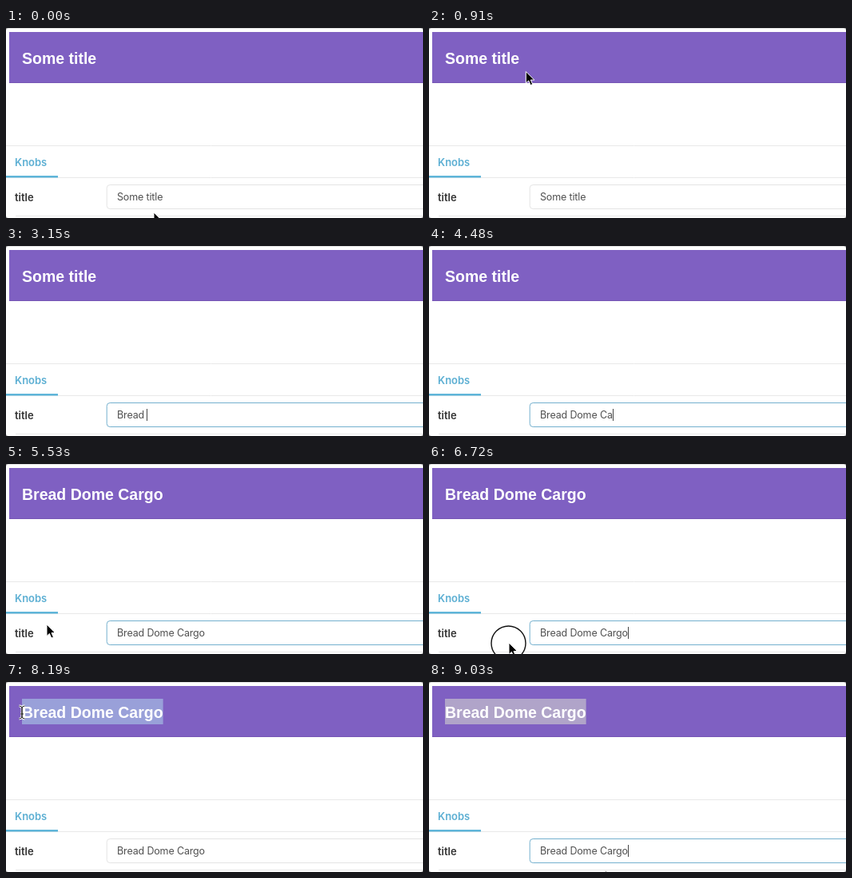
These frames come from a looping animation (522x238 px, 9.17 s). An HTML page:

```html
<!DOCTYPE html>
<html lang="en">
<head>
<meta charset="utf-8">
<title>Knobs demo</title>
<style>
  html, body { margin: 0; width: 100%; height: 100%; overflow: hidden; background: #888; }
  svg { display: block; width: 522px; height: 238px; }
  text { white-space: pre; font: 12.5px Inter, Roboto, sans-serif; }
  .bold { font-size: 13px; font-weight: 600; }
  #heading { font: bold 19.5px "Liberation Sans", Arial, sans-serif; fill: #fff; }
  #value { letter-spacing: -.15px; fill: #505050; }
</style>
</head>
<body>
<svg viewBox="0 0 522 238">
  <rect y=".25" width="522" height="237.75" rx="3" fill="#fff"/>
  <rect x="4" y="5" width="518" height="64" fill="#7f60c2"/>
  <path d="M4 68.5H522" stroke="#7656b5"/>
  <rect id="headSel" x="20" y="21" height="32"/>
  <text id="heading" x="20" y="45"></text>

  <path d="M0 147.5H522M0 187.5H522M12 235.5H522" stroke="#e8e8e8"/>
  <rect y="185" width="65" height="2.5" fill="#5fb5d9"/>
  <text class="bold" x="11" y="173" fill="#5cafd3">Knobs</text>
  <text class="bold" x="11" y="217" fill="#333">title</text>

  <rect id="field" x="126.2" y="196.5" width="420" height="30" rx="4" fill="#fff"/>
  <rect id="valueSel" y="203" height="17" fill="#b8d5f6"/>
  <text id="value" x="139" y="216"></text>
  <rect id="caret" y="204" width="1" height="15" fill="#444"/>

  <g id="pointer">
    <g id="ring" fill="none">
      <circle cx="-.5" cy=".5" stroke="#fff" stroke-opacity=".6" stroke-width="3"/>
      <circle cx="-.5" cy=".5" stroke="#111" stroke-width="1.4"/>
    </g>
    <path id="arrow" d="M0 0V14.5L3.4 11.4L5.8 17L8.4 15.9L6 10.5H10.5Z" fill="#000" stroke="#fff"/>
    <g id="beam" fill="none">
      <path id="bar" d="M-3.5-8Q0-8 0-5V5Q0 8-3.5 8M3.5-8Q0-8 0-5V5Q0 8 3.5 8M-2 2H2" stroke="#fff" stroke-width="2.8"/>
      <use href="#bar" style="display:none"/>
      <path d="M-3.5-8Q0-8 0-5V5Q0 8-3.5 8M3.5-8Q0-8 0-5V5Q0 8 3.5 8M-2 2H2" stroke="#222"/>
    </g>
  </g>
</svg>
<script>
const LOOP = 9170, STEP = 70, LEFT = 139, HEAD_LEFT = 20;
const OLD = 'Some title', NEW = 'Bread Dome Cargo';

// Moments of the story, in ms
const FOCUS = 1260, SELECTED = 1610, TYPE = 2380, UPDATE = 5250, WAKE = 5530;
const PANEL_CLICK = 6580, DRAG = 7630, REFOCUS = 8680;
const WORD_STARTS = [TYPE, 3360, 4200], KEY_GAP = 154, BLINK = 600, GLIDE = 420;
const PRESSES = [[FOCUS, 420], [PANEL_CLICK, 280], [DRAG, 560], [REFOCUS, 140]];

// Pointer stops: arrival time, x, y
const STOPS = [
  [0, 185, 231], [700, 115, 42], [FOCUS, 200, 212], [SELECTED, 18, 215], [1750, 51, 201],
  [6000, 40, 42], [6300, 240, 60], [6720, 100, 224], [7210, 150, 42],
  [7700, 196, 35], [8050, 20, 38], [8610, 280, 211], [LOOP, 200, 245]
];

const $ = id => document.getElementById(id);
const set = (id, attrs) => { for (const k in attrs) $(id).setAttribute(k, attrs[k]); };
const show = (id, on) => set(id, { visibility: on ? 'visible' : 'hidden' });
const clamp = v => Math.max(0, Math.min(1, v));

// Each glide ends on its stop; spare time before it is spent at rest.
function pointerAt(t) {
  const i = STOPS.findIndex(s => s[0] > t);
  const [t0, x0, y0] = STOPS[i - 1], [t1, x1, y1] = STOPS[i];
  const span = Math.min(GLIDE, t1 - t0);
  const u = clamp(1 - (t1 - t) / span), ease = u * u * (3 - 2 * u);
  return [x0 + (x1 - x0) * ease, y0 + (y1 - y0) * ease];
}

function typedAt(t) {
  return NEW.split(/(?<= )/).map((word, i) =>
    word.slice(0, Math.max(0, Math.floor((t - WORD_STARTS[i]) / KEY_GAP) + 1))).join('');
}

function caretAt(t) {
  if (t < WAKE) return t >= TYPE;
  return t >= REFOCUS || (t < DRAG && Math.floor((t - WAKE) / BLINK) % 2 === 1);
}

function drawPointer(t, x, y) {
  const visible = t <= TYPE || t >= WAKE;
  const overText = (y > 21 && y < 53 && x > 16 && x < 215) || (x > 126 && y > 196 && y < 227);
  const press = PRESSES.find(([at, hold]) => t >= at && t < at + hold);
  set('pointer', { transform: `translate(${x} ${y})` });
  show('arrow', visible && !overText);
  show('beam', visible && overText);
  show('ring', visible && press);
  if (press) {
    const r = 12.5 + 9 * clamp((t - press[0]) / 140);
    for (const circle of $('ring').children) circle.setAttribute('r', r);
  }
}

function drawField(t, x) {
  $('value').textContent = t < TYPE ? OLD : typedAt(t);
  const end = LEFT + $('value').getComputedTextLength();
  const fade = at => clamp((t - at) / 200);
  const focus = fade(FOCUS) - fade(DRAG) + fade(REFOCUS);
  const mix = (a, b) => Math.round(a + (b - a) * focus);
  set('field', { stroke: `rgb(${mix(228, 116)},${mix(228, 176)},${mix(228, 206)})` });

  const from = t < SELECTED ? Math.max(LEFT, Math.min(x, end)) : LEFT;
  show('valueSel', t >= FOCUS && t < TYPE);
  set('valueSel', { x: from, width: end - from });
  show('caret', caretAt(t));
  set('caret', { x: Math.round(end) });
}

function drawHeading(t, x) {
  $('heading').textContent = t < UPDATE ? OLD : NEW;
  const end = HEAD_LEFT + $('heading').getComputedTextLength();
  const from = t < 8050 ? Math.min(x, end) : HEAD_LEFT;
  show('headSel', t > 7700);
  set('headSel', { x: from, width: end - from, fill: t < REFOCUS ? '#99a0d9' : '#b0a4c9' });
}

let start;
function frame(now) {
  start ??= now;
  const t = Math.floor((now - start) % LOOP / STEP) * STEP;
  const [x, y] = pointerAt(t);
  drawHeading(t, x);
  drawField(t, x);
  drawPointer(t, x, y);
  requestAnimationFrame(frame);
}
requestAnimationFrame(frame);
</script>
</body>
</html>
```
